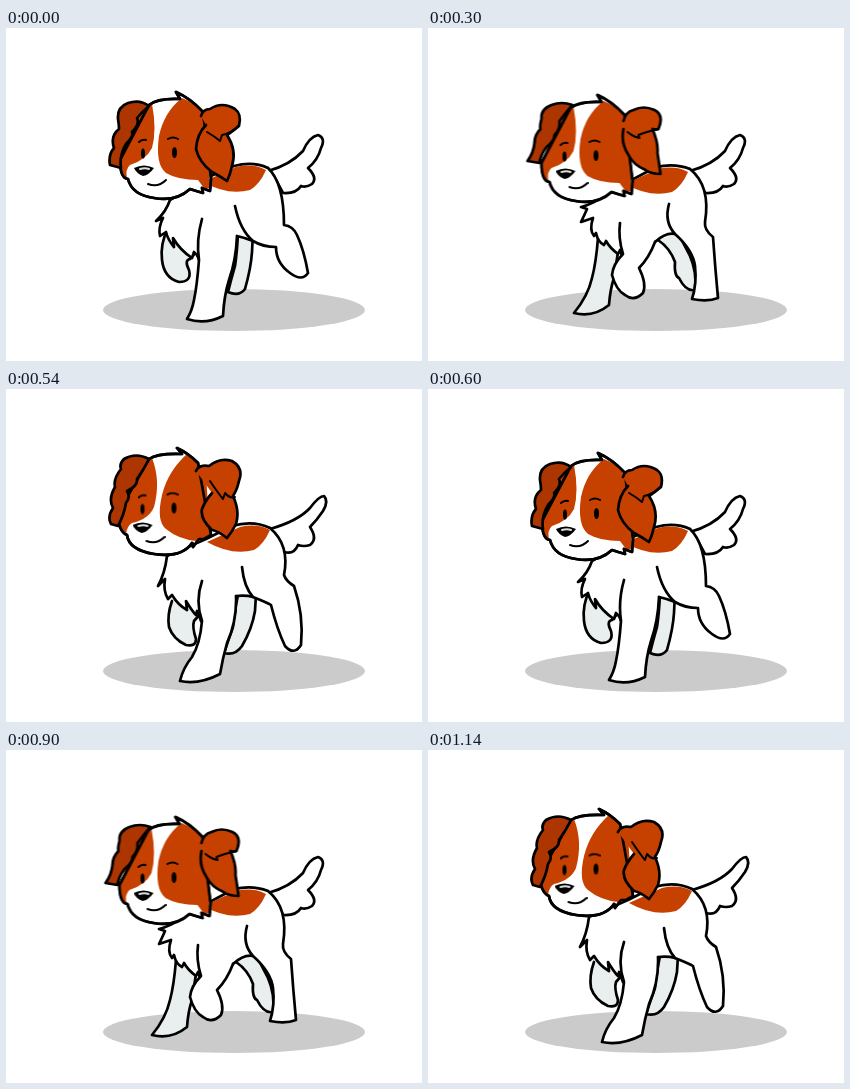
Write an HTML page without scripts that moves like this. It is 416 px wide and 333 px high and loops after 1200 ms.

```html
<!DOCTYPE html>
<html lang="en">
<head>
<meta charset="utf-8">
<title>Trotting puppy</title>
<style>
html, body { margin: 0; width: 100%; height: 100%; overflow: hidden; background: #fff }
svg { display: block; width: 100vw; height: 100vh }
path { fill: #fff; stroke: #000; stroke-width: 2.7; stroke-linecap: round; stroke-linejoin: round }
.far { fill: #e8efee }
.coat { fill: #c64000; stroke: none }
.ear { fill: #c64000 }
.ear.back { fill: #ad3600 }
.line { fill: none; stroke-width: 2 }
.edge { fill: none }
.ink { fill: #000; stroke: none }

/* stride: one full step cycle; bounce: twice per stride */
.stride { animation: 600ms steps(2) -2ms infinite }
.bounce { animation: 300ms steps(2) -2ms infinite }
#foreFar { animation-name: foreFar }
#hindFar { animation-name: hindFar }
#tail { animation-name: tail }
#torso { animation-name: torso }
#hind { animation-name: hind }
#saddle { animation-name: saddle }
#fore { animation-name: fore }
#head { animation-name: head }
.skull { animation-name: skull }
#patchL { animation-name: patchL }
#patchR { animation-name: patchR }
#earL { animation-name: earL }
#earR { animation-name: earR }
#fold { animation-name: fold }
#face { animation-name: face }
#muzzle { animation-name: muzzle }

@keyframes foreFar {
  0%, 100% { d: path("M162 200Q154 216 156 232Q158 250 173 254Q186 254 183 242Q178 232 184 231L190 224") }
  20% { d: path("M172 212Q158 232 154 243Q148 254 146 264Q153 272 163 261Q176 247 190 238L200 226"); animation-timing-function: linear(0 0% 33%, .5 33% 66%, .9 66% 100%) }
  50% { d: path("M170 210Q168 235 164 250Q160 268 146 285Q165 290 181 277Q182 262 186 250L190 224") }
  70% { d: path("M180 214Q180 224 184 232Q186 262 186 281Q204 285 215 277Q217 262 214 240L214 225") }
  90% { d: path("M166 212Q161 226 163 238Q167 250 180 256Q190 258 190 250Q186 238 188 232L195 224"); animation-timing-function: steps(1) }
}
@keyframes hindFar {
  0%, 100% { d: path("M232 205Q231 225 229 238Q225 252 222 264Q233 269 239 261Q245 240 246 224L247 205") }
  20% { d: path("M240 200Q242 220 243 240Q243 256 242 266Q252 269 258 262Q256 245 255 232L260 215"); animation-timing-function: linear(0 0% 33%, .5 33% 66%, .9 66% 100%) }
  50% { d: path("M230 212Q242 220 247 234Q246 248 251 250Q258 264 267 262Q269 244 262 228L250 205") }
  70% { d: path("M238 200Q234 216 229 224Q238 238 226 256Q236 266 248 256Q260 240 266 227L260 214") }
  90% { d: path("M232 206Q228 225 227 238Q222 252 218 264Q229 267 236 257Q246 240 249 222L250 205"); animation-timing-function: steps(1) }
}
@keyframes torso {
  0%, 100% { d: path("M262 140Q247 133 228 138L200 150L164 172Q160 184 150 193L157 190Q152 200 154 208L160 204Q162 212 168 219L167 210Q174 222 186 230L188 224Q191 226 193 232L231 208Q240 210 247 213") }
  20% { d: path("M262 140Q247 132 226 137L200 150L166 167Q164 184 158 193L164 190Q158 204 161 211L167 208Q168 214 172 219L172 212Q182 222 194 232L195 226Q199 226 202 228L239 205Q243 207 246 210"); animation-timing-function: linear(0 0% 33%, .5 33% 66%, .9 66% 100%) }
  50% { d: path("M262 141Q247 135 228 139L200 154L166 174Q158 178 153 179L159 181Q156 188 153 194L165 190Q161 202 166 208L168 205Q170 214 176 217L178 213Q182 220 190 226L192 222Q193 225 194 228L227 214Q238 204 247 206") }
  70% { d: path("M262 139Q247 133 226 137L200 150L162 166Q161 180 157 191L163 188Q161 204 164 212L169 207Q171 214 176 219L178 214Q183 219 187 222L189 212Q188 208 190 222L226 203Q237 199 246 205") }
  90% { d: path("M264 139Q247 131 226 137L200 150L161 167Q159 184 152 197L159 190Q157 202 162 210L166 206Q172 216 181 221L180 212Q186 222 190 226L191 222Q193 226 195 232L230 207Q240 206 247 208"); animation-timing-function: steps(1) }
}
@keyframes hind {
  0%, 100% { d: path("M229 178Q234 202 247 213Q257 219 270 219Q270 235 284 245Q296 254 302 245Q298 222 291 207Q287 198 278 197Q278 155 262 140") }
  20% { d: path("M240 174Q236 196 246 210Q262 219 261 232Q259 247 253 259Q264 268 278 262Q283 235 290 210Q280 203 280 198Q279 160 262 140"); animation-timing-function: linear(0 0% 33%, .5 33% 66%, .9 66% 100%) }
  50% { d: path("M241 176Q236 194 247 206Q265 222 267 238Q269 256 264 271Q280 274 290 270Q287 238 285 209Q276 202 277 194Q283 158 262 141") }
  70% { d: path("M241 178Q241 194 246 205Q270 220 272 236Q274 256 271 268Q286 270 298 263Q297 234 295 208Q284 205 284 196Q287 156 262 139") }
  90% { d: path("M236 178Q238 198 247 208Q262 214 265 216Q271 240 279 257Q288 267 295 256Q298 226 288 197Q280 192 278 186Q284 156 264 139"); animation-timing-function: steps(1) }
}
@keyframes fore {
  0%, 100% { d: path("M196 191Q190 212 193 232Q191 258 188 272Q186 283 181 291Q199 297 217 288Q218 268 223 252Q230 232 231 208") }
  20% { d: path("M195 195Q197 210 203 226Q213 243 215 262Q215 275 212 283Q228 289 241 277Q243 250 242 235Q243 218 239 205"); animation-timing-function: linear(0 0% 33%, .5 33% 66%, .9 66% 100%) }
  50% { d: path("M192 195Q190 210 195 226Q185 236 184 247Q188 262 197 267Q206 274 215 265Q219 256 211 240Q221 230 227 214") }
  70% { d: path("M194 194Q187 208 191 222Q180 246 178 258Q175 268 176 275Q186 284 203 271Q211 252 216 238Q225 222 226 203") }
  90% { d: path("M196 192Q189 212 196 232Q194 255 186 268Q177 279 174 292Q193 296 214 285Q217 268 221 254Q231 232 230 207"); animation-timing-function: steps(1) }
}
@keyframes saddle {
  0%, 100% { transform: none }
  20% { transform: translate(0, -1px); animation-timing-function: steps(3) }
  50% { transform: translate(0, 2px) }
  70% { transform: translate(1px, -1px) }
  90% { transform: translate(4px, -1px); animation-timing-function: steps(1) }
}
@keyframes head {
  0%, 100% { transform: none }
  20% { transform: none; animation-timing-function: steps(3) }
  50% { transform: translate(-.5px, 3px) }
  70% { transform: translate(1px, -2px) }
  90% { transform: none; animation-timing-function: steps(1) }
}
@keyframes tail {
  0%, 100% { d: path("M262 143Q284 137 297 123Q303 109 312 107Q320 110 315 120Q312 132 302 140Q312 150 306 156Q300 160 295 158Q290 166 277 165L270 152") }
  40% { d: path("M262 141Q286 135 299 127Q309 114 317 114Q326 116 318 127Q312 136 305 142Q312 150 303 158Q299 158 296 156Q291 166 280 161L268 150") }
  80% { d: path("M264 140Q292 132 304 119Q313 107 318 107Q323 112 317 122Q311 131 304 138Q312 150 304 156Q298 158 292 156Q288 166 278 163L270 150"); animation-timing-function: steps(1) }
}
@keyframes skull {
  0%, 100% { d: path("M143 77Q152 70 174 71L170 64Q184 70 197 84L205 150L204 163L196 160L197 165Q190 163 184 161Q170 174 148 170Q126 167 122 151Q114 150 114 132Z") }
  40% { d: path("M145 72Q152 63 172 64L167 59Q180 62 190 74L205 146L198 152L193 151L186 159Q188 155 190 152Q172 168 148 166Q124 162 121 146Q112 142 112 124Z") }
  80% { d: path("M143 70Q152 64 176 65L171 59Q182 64 192 74L205 146L198 150L193 150L187 158Q188 155 186 154Q176 169 148 165Q123 161 121 146Q112 142 112 124Z"); animation-timing-function: steps(1) }
}
@keyframes patchL {
  0%, 100% { d: path("M146 76Q151 102 146 120Q140 132 124 137Q119 141 121 151Q114 148 114 132L132 84Z") }
  40% { d: path("M147 71Q154 98 148 120Q143 131 128 133Q122 136 120 145Q112 142 112 124L132 80Z") }
  80% { d: path("M146 69Q155 92 148 118Q143 130 126 134Q121 137 120 145Q112 142 112 124L132 80Z"); animation-timing-function: steps(1) }
}
@keyframes patchR {
  0%, 100% { d: path("M176 70Q158 84 153 108Q149 136 160 145Q172 152 192 152L198 160L204 160L200 90Q190 75 176 70Z") }
  40% { d: path("M182 66Q161 82 155 108Q152 136 164 146Q174 150 190 151L190 154L204 146L200 84Q192 72 182 66Z") }
  80% { d: path("M181 65Q162 82 156 106Q150 132 160 140Q172 150 190 152L190 154L204 146L200 86Q190 71 181 65Z"); animation-timing-function: steps(1) }
}
@keyframes earL {
  0%, 100% { d: path("M143 78Q134 71 122 75Q111 79 112 91Q113 97 113 101Q104 108 108 120Q102 127 104 137L115 140Q113 128 120 116Q128 108 126 104Q134 96 131 90Q136 84 143 78Z") }
  20%, 70% { d: path("M145 73Q134 65 121 71Q114 76 117 80Q109 88 111 104Q105 114 109 128Q107 138 111 145L118 137Q115 126 121 116Q128 110 126 104Q136 102 134 92Q138 82 145 73Z") }
  40%, 90% { d: path("M143 70Q130 63 118 70Q113 75 115 80Q107 90 109 98Q102 110 107 119Q101 128 105 135L112 137Q118 126 120 114Q125 108 121 102Q132 97 131 90Q138 80 143 70Z"); animation-timing-function: steps(1) }
  50% { d: path("M145 74Q134 70 124 74Q113 78 114 88Q112 95 113 98Q107 104 107 112Q106 122 100 130L112 132Q113 124 119 116Q127 110 127 104Q133 98 132 90Q138 82 145 74Z") }
}
@keyframes earR {
  0%, 100% { d: path("M195 88Q197 81 204 81Q216 73 229 81Q236 86 233 98Q226 104 221 107Q231 122 226 138Q224 147 221 153Q212 147 206 144Q193 134 190 121Q191 106 200 97") }
  20%, 70% { d: path("M186 83Q188 75 198 78Q214 69 228 72Q237 80 231 97Q229 103 225 105Q232 120 229 138Q224 148 216 152Q206 144 201 132Q194 122 195 112Q196 102 203 97") }
  40%, 90% { d: path("M190 82Q193 75 203 77Q214 68 226 72Q238 79 233 92Q231 101 227 107Q234 122 230 135Q226 143 221 149Q212 142 206 141Q194 130 196 120Q199 112 206 104"); animation-timing-function: steps(1) }
  50% { d: path("M196 90Q198 81 206 79Q216 74 227 79Q237 84 231 98Q228 99 225 98Q231 112 230 122Q232 134 233 143Q224 143 218 139Q206 134 201 124Q193 112 196 98") }
}
@keyframes fold {
  0%, 100% { d: path("M201 104Q208 108 214 113L216 107Q224 106 232 98") }
  20%, 70% { d: path("M203 97Q209 104 215 112L217 106Q221 107 226 104") }
  40%, 90% { d: path("M204 92Q212 104 217 110L219 104Q224 110 229 108"); animation-timing-function: steps(1) }
  50% { d: path("M200 101Q206 106 212 107L211 104Q218 101 231 98") }
}
@keyframes face {
  0%, 100% { transform: none }
  40% { transform: translate(1.5px, -6px) }
  80% { transform: translate(-.5px, -5.5px); animation-timing-function: steps(1) }
}
@keyframes muzzle {
  0%, 100% { transform: none }
  40% { transform: translate(-1px, -4px) }
  80% { transform: translate(-1.5px, -4px); animation-timing-function: steps(1) }
}
</style>
</head>
<body>
<svg viewBox="0 0 416 333">
  <ellipse cx="228" cy="282" rx="131" ry="21" fill="#cbcbcb"/>
  <path id="hindFar" class="stride far"/>
  <path id="foreFar" class="stride far"/>
  <path id="tail" class="bounce"/>
  <path id="torso" class="stride"/>
  <path id="hind" class="stride"/>
  <path id="saddle" class="stride coat" d="M197 154L230 139Q247 135 260 142Q254 156 244 162Q222 168 197 154Z"/>
  <path id="fore" class="stride"/>
  <g id="head" class="stride">
    <path class="bounce skull"/>
    <path id="patchL" class="bounce coat"/>
    <path id="patchR" class="bounce coat"/>
    <path class="bounce skull edge"/>
    <path id="earL" class="stride ear back"/>
    <path id="earR" class="stride ear"/>
    <path id="fold" class="stride line"/>
    <g id="face" class="bounce">
      <ellipse cx="137" cy="125.500" rx="2" ry="5"/>
      <ellipse cx="168.500" cy="124.500" rx="2.500" ry="5.500"/>
      <path class="line" d="M133 114Q136 111 140 112M162 111Q167 108 172 111"/>
    </g>
    <g id="muzzle" class="bounce">
      <path class="ink" d="M128 140Q138 135 148 140Q143 147 137 148Q130 145 128 140Z"/>
      <path class="line" style="stroke:#ddd" d="M134 141Q139 139.500 143 141"/>
      <path class="line" d="M142 156Q152 160 160 152"/>
    </g>
  </g>
</svg>
</body>
</html>
```
